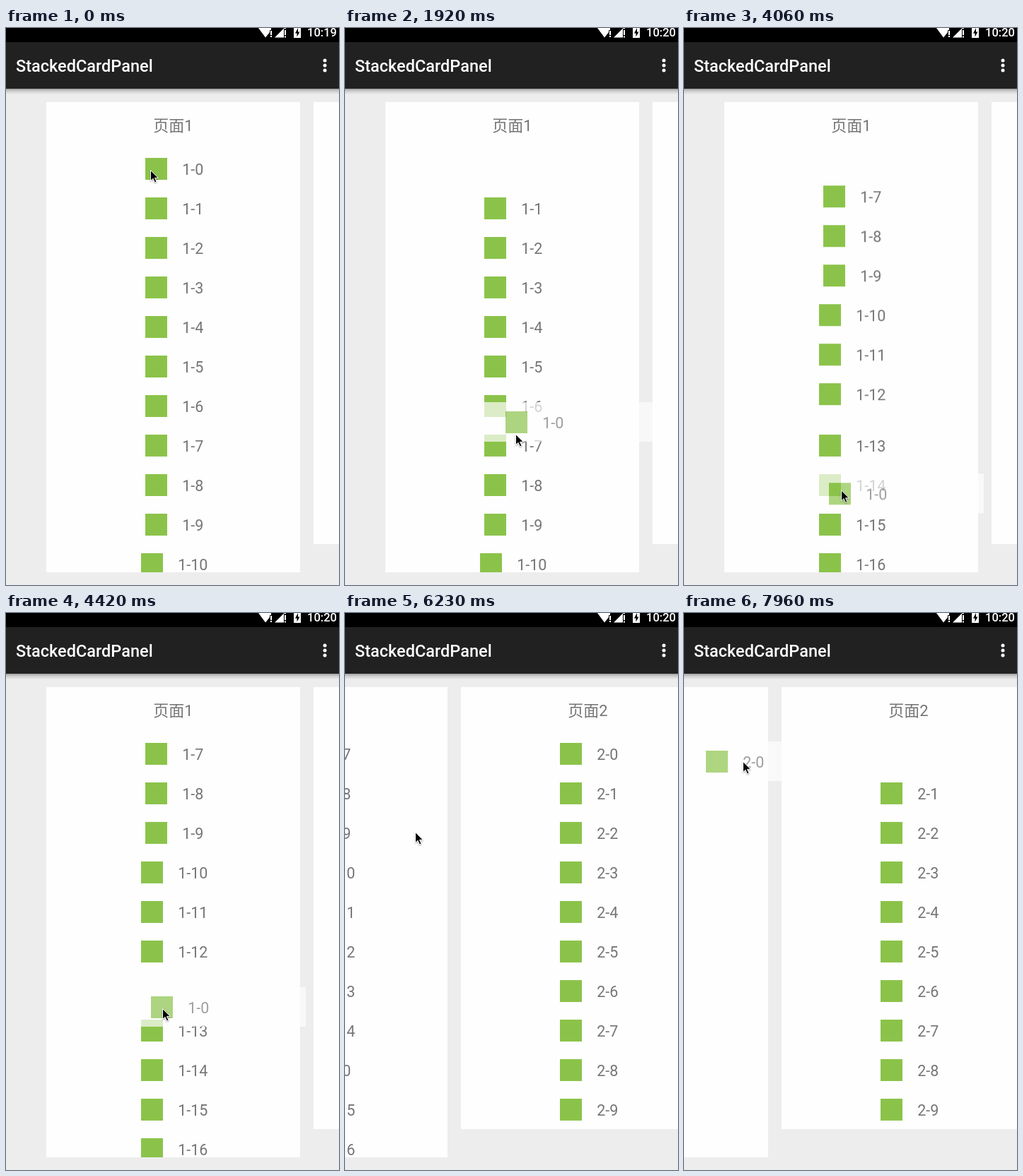
Recreate the animation shown at these times as an HTML page. Size 471 by 789 pixels, loop 8000 ms.

```html
<!DOCTYPE html>
<html lang="zh">
<head>
<meta charset="utf-8">
<title>StackedCardPanel</title>
<style>
html, body { margin: 0; width: 100%; height: 100%; overflow: hidden; }
body { position: relative; background: #ededed; font-family: Roboto, "Noto Sans CJK SC", "Noto Sans CJK", sans-serif; }
body div, body svg { position: absolute; }
.status { left: 0; top: 0; width: 471px; height: 20px; background: #000; }
.clock { left: 426px; top: -3px; font: 500 16.5px/20px Roboto, sans-serif; color: #fff; }
.bar { left: 0; top: 20px; width: 471px; height: 66px; background: #212121; }
.bar::after { content: ""; position: absolute; left: 0; top: 66px; width: 100%; height: 8px;
  background: linear-gradient(rgba(0,0,0,.32), rgba(0,0,0,.12) 45%, rgba(0,0,0,0)); }
.title { left: 14px; top: 1px; font: 500 23.5px/67px Roboto, sans-serif; color: #fff; white-space: nowrap; }
.pager { left: 0; top: 0; width: 471px; height: 789px; }
.page { top: 105px; width: 359px; background: #fefefe; color: #757575; font-size: 21.5px; }
.head { left: 0; top: 0; width: 359px; text-align: center; font-size: 22px; line-height: 68px; }
.list { left: 0; top: 66px; width: 359px; bottom: 0; overflow: hidden; }
.row { left: 0; top: 0; width: 359px; height: 56px; background: #fefefe;
  display: flex; align-items: center; justify-content: center; }
.row i { width: 31px; height: 31px; margin: 0 21.2px 0 3.4px; background: #8bc34a; }
.row span { padding-top: 2px; }
.held { top: 66px; z-index: 1; }
.cursor { left: 0; top: 0; overflow: visible; filter: drop-shadow(0 1px 1px rgba(0,0,0,.35)); }
</style>
</head>
<body>
<div class="pager" id="pager">
  <div class="page" style="left:57px;height:666px"><div class="head">页面1</div><div class="list"><div id="list1"></div></div></div>
  <div class="page" style="left:435px;height:626px"><div class="head">页面2</div><div class="list"><div id="list2"></div></div></div>
</div>
<div class="bar">
  <div class="title">StackedCardPanel</div>
  <svg style="left:447px;top:22px" width="8" height="24" fill="#fff"><circle cx="4" cy="4" r="2.5"/><circle cx="4" cy="11" r="2.5"/><circle cx="4" cy="18" r="2.5"/></svg>
</div>
<div class="status">
  <svg style="left:350px;top:0" width="70" height="20" fill="#fff">
    <path d="M7 0H25V3H23V6L17 13.5Z"/><path d="M24 4h2v6h-2zm0 7h2v2h-2z"/>
    <path d="M30 13.5L43.5 0H46V1H43V13.5Z"/><path d="M44 3h2v7h-2zm0 8.500h2v2h-2z"/>
    <path d="M57 0H67V14H57Z"/><path fill="#000" d="M63 0L59 7.500H61.500V12.500L65.500 5.500H63Z"/>
  </svg>
  <div class="clock" id="early">10:19</div>
  <div class="clock" id="late">10:20</div>
</div>
<svg class="cursor" id="cursor" width="14" height="20"><path d="M.5 .5V15.500L4 12.300L6.500 18L9 16.900L6.500 11.400H11.300Z" fill="#000" stroke="#fff" stroke-width="1"/></svg>

<script>
const LOOP = 8000, ROW = 56;
const IO = 'cubic-bezier(.37,0,.63,1)', IN = 'cubic-bezier(.4,0,1,1)',
      OUT = 'cubic-bezier(0,0,.4,1)', HOLD = 'steps(1, end)';
const $ = id => document.getElementById(id);
const start = document.timeline.currentTime;

// Each step is [time, value, easing towards the next step].
function play(el, prop, steps) {
  const frames = steps.map(([t, v, easing = 'linear']) => ({ offset: t / LOOP, [prop]: v, easing }));
  if (steps[0][0] > 0) frames.unshift({ ...frames[0], offset: 0, easing: 'linear' });
  const last = frames[frames.length - 1];
  if (last.offset < 1) frames.push({ ...last, offset: 1 });
  el.animate(frames, { duration: LOOP, iterations: Infinity }).startTime = start;
}
const move = (el, steps) =>
  play(el, 'transform', steps.map(([t, x, y, e]) => [t, `translate(${x}px,${y}px)`, e]));

function addRow(parent, label, cls = '') {
  const row = document.createElement('div');
  row.className = 'row ' + cls;
  row.innerHTML = `<i></i><span>${label}</span>`;
  parent.append(row);
  return row;
}

// Rows of page 1 close the gap when the held row takes a later slot.
const shiftAt = i => i < 7 ? [2760, 3030] : i < 13 ? [3950, 4250] : i < 15 ? [5000, 5300] : null;
for (let i = 1; i <= 16; i++) {
  const row = addRow($('list1'), '1-' + i), shift = shiftAt(i), y = i * ROW;
  row.style.top = y + 'px';
  if (shift) move(row, [[shift[0], 0, 0, IO], [shift[1], 0, -ROW]]);
}
for (let i = 1; i <= 9; i++) addRow($('list2'), '2-' + i).style.top = i * ROW + 'px';
move($('list1'), [[3100, 0, 0, IO], [3530, 0, -6 * ROW]]);

const [page1, page2] = document.querySelectorAll('.page');
const first = addRow(page1, '1-0', 'held');
move(first, [
  [1170, 0, 0, IO], [1920, 30, 359], [1980, 30, 359, OUT], [2160, 22, 329],
  [2460, 22, 329], [2520, 22, 328], [2760, 22, 328, IN], [3040, 17, 357, OUT],
  [3320, 8, 541], [3940, 8, 541, IN], [4060, 8, 461, OUT], [4420, 8, 359],
  [4990, 8, 359, IO], [5420, 2, 432], [5540, 2, 432, OUT], [5700, 0, 8 * ROW]
]);
play(first, 'opacity', [[0, 1, HOLD], [1170, .7, HOLD], [5700, 1]]);

const second = addRow(page2, '2-0', 'held');
move(second, [
  [7200, 0, 0], [7260, 7, -5, IO], [7660, -166, 11], [7959, -166, 11, HOLD], [7960, -247, 11]
]);
play(second, 'opacity', [[0, 1, HOLD], [7200, .7]]);

move($('pager'), [
  [5820, 0, 0, IO], [6230, -271, 0], [6280, -271, 0, OUT], [6580, -378, 0],
  [7959, -378, 0, HOLD], [7960, -297, 0]
]);

move($('cursor'), [
  [230, 204, 201], [390, 217, 201], [1170, 217, 201, IO], [1920, 241, 575],
  [1980, 241, 575, OUT], [2160, 237, 531], [2460, 237, 531], [2520, 237, 529],
  [2760, 237, 529, IN], [3040, 224, 618, OUT], [3300, 222, 742], [3940, 222, 742, IN],
  [4060, 222, 655, OUT], [4420, 221, 560], [4990, 221, 560, IO], [5420, 216, 640],
  [5540, 216, 640, IO], [5760, 370, 366], [5820, 370, 366, IO], [6230, 99, 310],
  [6280, 99, 310, IO], [6580, 254, 195, HOLD], [6660, 252, 192], [7200, 252, 192],
  [7260, 259, 187, IO], [7660, 83, 210]
]);

play($('early'), 'opacity', [[0, 1, HOLD], [1500, 0]]);
play($('late'), 'opacity', [[0, 0, HOLD], [1500, 1]]);
</script>
</body>
</html>
```
